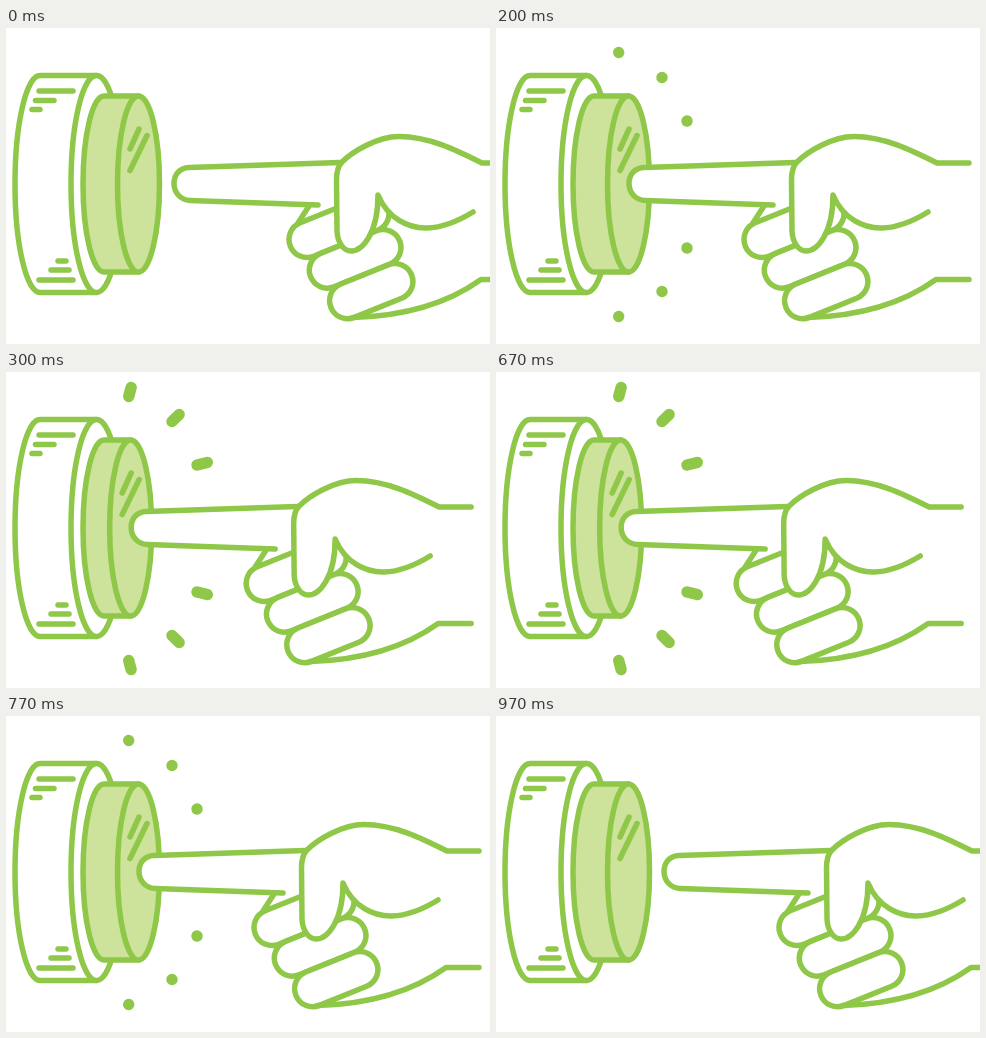
An HTML page for the animation above (1.07 s loop, 484x316 px).

```html
<!DOCTYPE html>
<html lang="en">
<head>
<meta charset="utf-8">
<title>Press the button</title>
<style>
  html, body { margin: 0; width: 100%; height: 100%; overflow: hidden; background: #fff; }
  svg { display: block; width: 484px; height: 316px; }
  .ink { fill: none; stroke: #8fc748; stroke-width: 5.5; stroke-linecap: round; stroke-linejoin: round; }
  .white { fill: #fff; }
  .tint { fill: #cde29a; }
  #rays { stroke-width: 11.4; }
</style>
</head>
<body>
<svg viewBox="0 0 484 316">
  <g class="ink">
    <path class="white" d="M90.500 47.500H34A25 108.500 0 0 0 34 264.500H90.500"/>
    <ellipse class="white" cx="90.5" cy="156" rx="25.5" ry="108.5"/>
    <path d="M33 63H67M29.500 72.500H48M26 81.500H34M52 233H60M45 242H63M33 252H67"/>
    <path id="side" class="tint"/>
    <g id="cap">
      <ellipse class="tint" cx="132.5" cy="156" rx="21" ry="88"/>
      <path d="M133 101L124 121M141 107.500L124 142.500"/>
    </g>
  </g>
  <g id="rays" class="ink">
    <path id="fan"/>
    <use href="#fan" transform="translate(0 313) scale(1 -1)"/>
  </g>
  <g id="hand" class="ink">
    <path d="M303 178L292 195"/>
    <g id="fingers" class="white"></g>
    <path class="white" d="M334 134.500L183 139.500C173 140 168 147 168 155.500S174 172 184 172.500L312 177"/>
    <path class="white" d="M508 135H476C450 122 423 108.500 393 108.500C371 108.500 346 124 336 134C331 139 330.500 145 330.500 152L331 203C331.500 215 338 223 345 223C356 223 372 206 372 167C382 191 403 200.500 421 200C438 199.500 454 192 467 184"/>
    <path d="M347 289.500C402 288 445 273 475 251.500H508"/>
  </g>
</svg>
<script>
  const LOOP = 1070, STEP = 100, RELEASE = 670;
  const STEPS = 4, TOUCH = 2;          // steps to full press, step of first contact
  const APPROACH = 35, PRESS = 18;     // travel before and after contact
  const $ = id => document.getElementById(id);

  // Three curled fingers, each lower and shorter than the last.
  const R = 18;
  $('fingers').innerHTML = [0, 1, 2].map(i => `
    <rect x="${-R}" y="${-R}" width="${69 - 9 * i + 2 * R}" height="${2 * R}" rx="${R}"
      transform="translate(${301 + 20.3 * i} ${211.5 + 30.6 * i}) rotate(-22)"/>`).join('');

  const rayStarts = [[122.7, 24.5], [166, 49.5], [191, 93]];

  function fan(reach) {
    return rayStarts.map(([x, y], i) => {
      const angle = (75 - 30.5 * i) * Math.PI / 180;
      const len = Math.max(0.01, reach * (18.7 + 1.3 * i));
      return `M${x} ${y}l${len * Math.cos(angle)} ${-len * Math.sin(angle)}`;
    }).join('');
  }

  // Hard steps in, a hold, then the same steps back out.
  function stepAt(t) {
    return t < RELEASE
      ? Math.min(STEPS, Math.floor(t / STEP))
      : STEPS - 1 - Math.floor((t - RELEASE) / STEP);
  }

  function draw(step) {
    const near = Math.min(1, step / TOUCH);
    const reach = Math.max(0, (step - TOUCH) / (STEPS - TOUCH));
    const press = PRESS * reach ** 1.2;
    const x = 132.5 - press;
    $('hand').setAttribute('transform', `translate(${-APPROACH * near - press} 0)`);
    $('cap').setAttribute('transform', `translate(${-press} 0)`);
    $('side').setAttribute('d', `M${x} 68H98A21 88 0 0 0 98 244H${x}`);
    $('fan').setAttribute('d', step < TOUCH ? '' : fan(reach));
  }

  const start = performance.now();
  let shown;
  function tick() {
    const step = Math.max(0, stepAt((performance.now() - start) % LOOP));
    if (step !== shown) draw(shown = step);
    requestAnimationFrame(tick);
  }
  tick();
</script>
</body>
</html>
```
